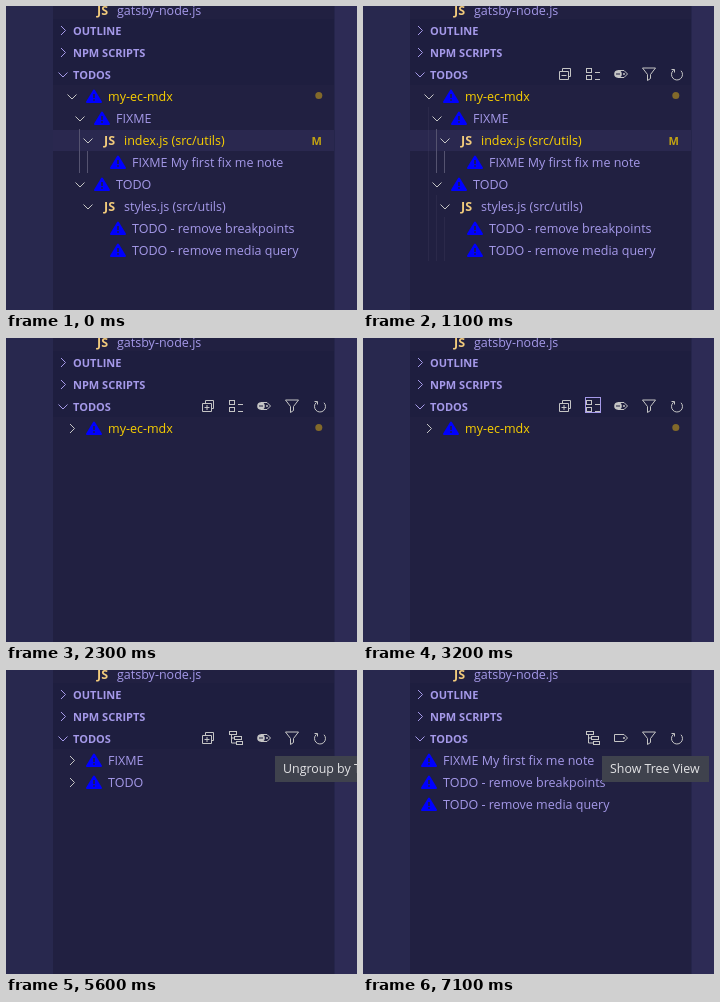
These frames come from a looping animation (351 px wide and 304 px high, 8 s). An HTML page with a canvas:

```html
<!DOCTYPE html>
<html lang="en">
<head>
<meta charset="utf-8">
<title>Todo panel</title>
<style>
  html, body { margin: 0; width: 100%; height: 100%; overflow: hidden; background: #212041; }
  canvas { display: block; width: 351px; height: 304px; }
</style>
</head>
<body>
<canvas id="stage"></canvas>
<script>
const W = 351, H = 304, LOOP = 8000, ROW = 22, TREE_TOP = 79;
const SANS = '"Open Sans", "Noto Sans", sans-serif';
const BODY = `500 12.5px ${SANS}`;
const C = {
  side: '#212041', head: '#1e1e3f', bar: '#28284e', border: '#25254b', editor: '#2d2b55',
  select: '#2a284f', text: '#a599e9', changed: '#fad000', icon: '#c5c5c5', alert: '#0000ff',
  js: '#f2cb7c', guide: '#555370', tipBack: '#3f424d', tipText: '#e4e4e6'
};

const canvas = document.getElementById('stage');
const ctx = canvas.getContext('2d');
const scale = window.devicePixelRatio || 1;
canvas.width = W * scale;
canvas.height = H * scale;

const row = (level, kind, label, extra = {}) => ({ level, kind, label, ...extra });

const fullTree = [
  row(0, 'alert', 'my-ec-mdx', { open: true, changed: true, badge: 'dot' }),
  row(1, 'alert', 'FIXME', { open: true }),
  row(2, 'js', 'index.js (src/utils)', { open: true, changed: true, badge: 'M', selected: true }),
  row(3, 'alert', 'FIXME My first fix me note'),
  row(1, 'alert', 'TODO', { open: true }),
  row(2, 'js', 'styles.js (src/utils)', { open: true }),
  row(3, 'alert', 'TODO - remove breakpoints'),
  row(3, 'alert', 'TODO - remove media query')
];
const collapsedTree = [{ ...fullTree[0], open: false }];
const tagTree = ['FIXME', 'TODO'].map(tag => row(0, 'alert', tag, { open: false }));
const flatList = fullTree.filter(r => r.level === 3).map(r => ({ ...r, level: 0, flat: true }));

function fill(color, x, y, w, h) {
  ctx.fillStyle = color;
  ctx.fillRect(x, y, w, h);
}

// y is the middle of the line; the baseline lies 5px below it
function text(str, x, y, color, font = BODY) {
  ctx.font = font;
  ctx.fillStyle = color;
  ctx.fillText(str, x, y + 5);
}

function disc(color, x, y, r) {
  ctx.fillStyle = color;
  ctx.beginPath();
  ctx.arc(x, y, r, 0, 7);
  ctx.fill();
}

function line(points, closed) {
  ctx.beginPath();
  points.forEach(([x, y]) => ctx.lineTo(x, y));
  if (closed) ctx.closePath();
  ctx.stroke();
}

function pen(color, width = 1) {
  ctx.strokeStyle = color;
  ctx.lineWidth = width;
}

function at(x, y, draw) {
  ctx.save();
  ctx.translate(x, y);
  draw();
  ctx.restore();
}

function chevron(x, y, open, color = C.icon) {
  at(x, y + 0.5, () => {
    pen(color);
    line(open ? [[-4.5, -2], [0, 2.5], [4.5, -2]] : [[-2, -4.5], [2.5, 0], [-2, 4.5]]);
  });
}

function alertIcon(x, y, back) {
  at(x, y + 0.5, () => {
    ctx.fillStyle = C.alert;
    pen(C.alert, 2);
    ctx.lineJoin = 'round';
    line([[0, -6], [7, 5.5], [-7, 5.5]], true);
    ctx.fill();
    fill(back, -0.8, -2.5, 1.6, 4);
    fill(back, -0.8, 2.7, 1.6, 1.6);
  });
}

// Toolbar icons, each drawn around its own centre
const icons = {
  stack(plus) {
    line([[-5.5, -2.5], [3.5, -2.5], [3.5, 5.5], [-5.5, 5.5]], true);
    line([[-2.5, -2.5], [-2.5, -5.5], [5.5, -5.5], [5.5, 2.5], [3.5, 2.5]]);
    line([[-3.5, 1.5], [1.5, 1.5]]);
    if (plus) line([[-1, -1], [-1, 4]]);
  },
  list() {
    for (const y of [-5.5, 1.5]) {
      ctx.strokeRect(-6.5, y, 5, 4);
      line([[2, y + 4], [7, y + 4]]);
    }
  },
  tree() {
    ctx.strokeRect(-6.5, -6.5, 7, 3);
    ctx.strokeRect(-1.5, -1.5, 7, 3);
    ctx.strokeRect(0.5, 3.5, 6, 3);
    line([[-4.5, -3.5], [-4.5, 5], [0.5, 5]]);
    line([[-4.5, 0], [-1.5, 0]]);
  },
  tag(grouped) {
    const left = grouped ? -3 : -6.5;
    line([[left, -3.5], [3, -3.5], [6.5, 0], [3, 3.5], [left, 3.5]], true);
    disc(C.icon, 3, 0, 1);
    if (grouped) {
      disc(C.icon, -3, 0, 3.8);
      fill(C.head, -5, -0.5, 4, 1);
    }
  },
  filter() {
    line([[-6.5, -6], [6.5, -6], [1.5, 0.5], [1.5, 4.5], [-1.5, 6.5], [-1.5, 0.5]], true);
  },
  refresh() {
    ctx.beginPath();
    ctx.arc(0, 0.5, 5.5, -0.75, Math.PI * 1.3);
    ctx.stroke();
    line([[-5.5, -4.5], [-2.5, -4.5], [-2.5, -1.5]]);
  }
};

function toolbar(t) {
  if (t < 100) return;
  const flat = t >= 6100;
  const put = (name, x, arg) => at(x, 68, () => { pen(C.icon); icons[name](arg); });
  if (!flat) put('stack', 202, t >= 1600);
  put(t >= 3300 ? 'tree' : 'list', 230);
  put('tag', 258, !flat);
  put('filter', 286);
  put('refresh', 314);
  const focus = t >= 1500 && t < 1700 ? 202 : t >= 3200 && t < 3400 ? 230 : 0;
  if (focus) {
    pen(C.text);
    ctx.strokeRect(focus - 7.5, 59.5, 15, 15);
  }
}

function section(label, y, open) {
  chevron(57, y, open, C.text);
  text(label, 67, y, C.text, `bold 11px ${SANS}`);
}

function jsIcon(x, y) {
  text('JS', x - 6, y, C.js, `bold 12.5px ${SANS}`);
}

function guide(x, from, to, alpha) {
  ctx.globalAlpha = alpha;
  fill(C.guide, x, TREE_TOP + from * ROW, 1, (to - from) * ROW);
  ctx.globalAlpha = 1;
}

function drawRow(r, i, hovered) {
  const y = TREE_TOP + i * ROW + 11;
  const x = 8 * r.level + (r.flat ? -22 : 0);
  const lit = r.selected || hovered;
  if (lit) fill(C.select, 47, y - 10, 281, ROW - 1);
  if (r.open !== undefined) chevron(66 + x, y, r.open);
  if (r.kind === 'js') jsIcon(88 + x, y);
  else alertIcon(88 + x, y, lit ? C.select : C.side);
  text(r.label, 102 + x, y, r.changed ? C.changed : C.text);
  if (r.badge === 'M') text('M', 305.5, y, '#c1a213', `bold 11px ${SANS}`);
  if (r.badge === 'dot') disc('#82692a', 312.8, y - 0.5, 3.5);
}

function drawTree(t) {
  const rows = t < 2300 ? fullTree : t < 3900 ? collapsedTree : t < 6600 ? tagTree : flatList;
  const hover = t >= 800 && t < 1100;
  rows.forEach((r, i) => drawRow(r, i, hover && i === 0));
  if (rows !== fullTree) return;
  guide(73, 2, 4, 1);
  guide(81, 3, 4, 1);
  // The remaining guides show only while the pointer is over the tree
  const shown = t >= 900 && t < 1100 ? 0.4 : t >= 1100 && t < 1200 ? 0.2 : 0;
  if (shown) {
    guide(65, 1, 8, shown);
    guide(73, 5, 8, shown);
    guide(81, 6, 8, shown);
  }
}

const tips = [
  { from: 2900, to: 3200, x: 239, w: 140, label: 'Show Tags Only View' },
  { from: 5600, to: 6000, x: 269, w: 107, label: 'Ungroup by Tag' },
  { from: 7100, to: LOOP, x: 239, w: 107, label: 'Show Tree View' }
];

function drawTip(t) {
  const tip = tips.find(p => t >= p.from && t < p.to);
  if (!tip) return;
  fill(C.tipBack, tip.x, 86, tip.w, 26);
  text(tip.label, tip.x + 8, 98, C.tipText, `12.4px ${SANS}`);
}

function draw(t) {
  ctx.setTransform(scale, 0, 0, scale, 0, 0);
  fill(C.side, 0, 0, W, H);
  fill(C.bar, 0, 0, 47, H);
  fill(C.border, 328, 0, 1, H);
  fill(C.editor, 329, 0, W - 329, H);
  fill(C.head, 47, 13, 281, 66);

  jsIcon(97, 4);
  text('gatsby-node.js', 111, 4, C.text);
  section('OUTLINE', 24, false);
  section('NPM SCRIPTS', 46, false);
  section('TODOS', 68, true);
  toolbar(t);
  drawTree(t);
  drawTip(t);
}

const start = performance.now();
function tick() {
  draw((performance.now() - start) % LOOP);
  requestAnimationFrame(tick);
}
tick();
</script>
</body>
</html>
```
